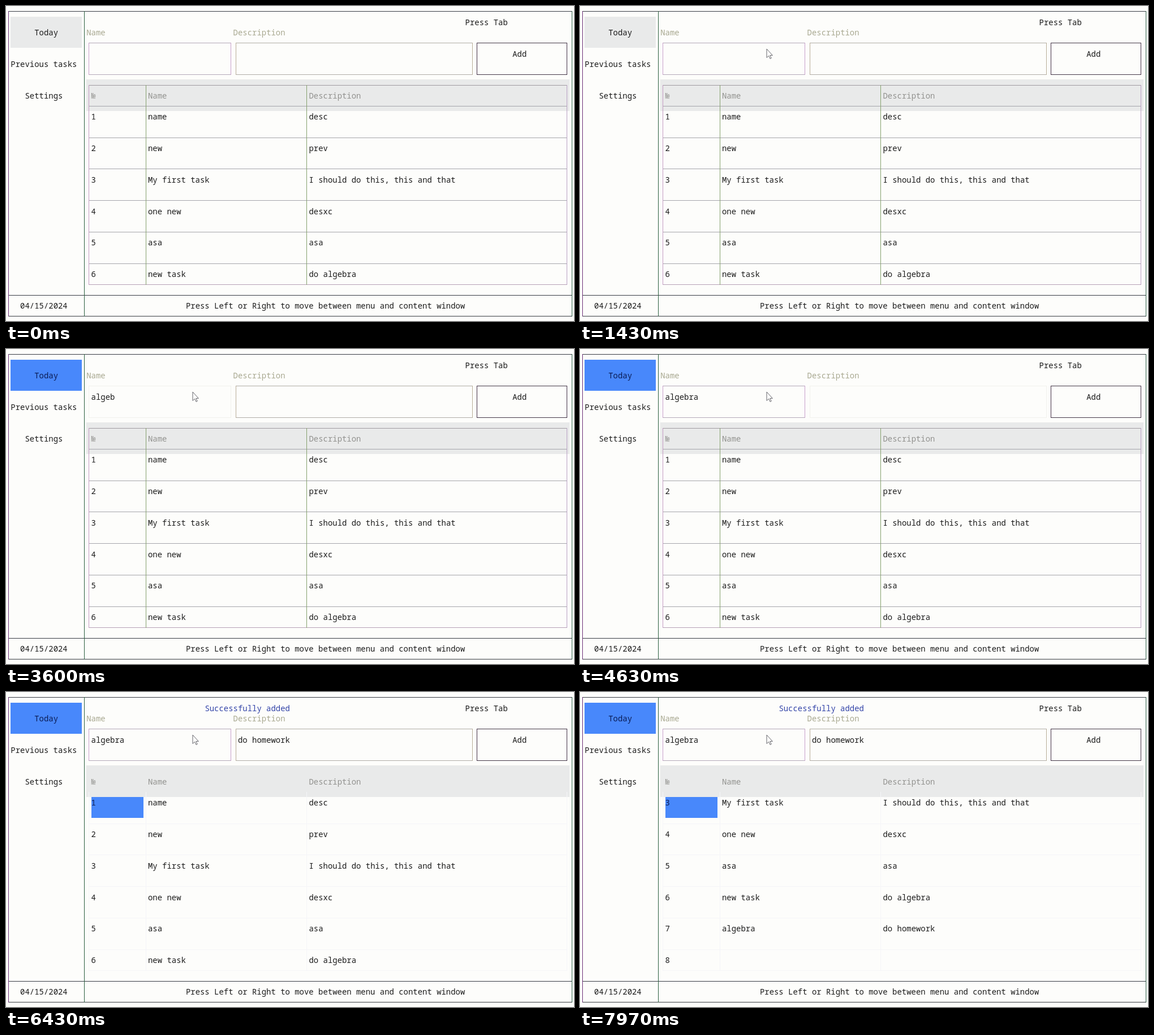
Animation, 1004 px wide and 558 px high, one loop 8 s. Source, as an HTML page:

```html
<!DOCTYPE html>
<html lang="en">
<head>
<meta charset="utf-8">
<title>Task list</title>
<style>
  html, body { margin: 0; width: 100%; height: 100%; overflow: hidden; background: #fdfdfb; }
  svg { display: block; width: 100%; height: 100%; }
  text { font: 13.945px "Noto Sans Mono", "DejaVu Sans Mono", monospace; white-space: pre; fill: #1c1c1c; }
  .label { fill: #a9a991; }
  .head { fill: #92928f; }
  .ok { fill: #3344a8; }
  .selected { fill: #0b1c55; }
  line, rect { shape-rendering: crispEdges; }
  line { stroke-width: 1; }
</style>
</head>
<body>
<svg id="stage" viewBox="0 0 1004 558"></svg>
<script>
// The stage is a terminal of 120 by 30 character cells.
const LOOP = 8000, CELL_W = 1004 / 120, CELL_H = 558 / 30;
const BLUE = '#4888fb', PALE = '#e9eaea', FAINT = '#f1f1ec';
const svg = document.getElementById('stage');

function add(tag, attrs, content = '') {
  const el = document.createElementNS('http://www.w3.org/2000/svg', tag);
  for (const key in attrs) el.setAttribute(key, attrs[key]);
  el.textContent = content;
  return svg.appendChild(el);
}
const label = (col, row, content, cls = '') =>
  add('text', { x: col * CELL_W, y: Math.round(row * CELL_H + 15.2), class: cls }, content);
const fillRect = (col, row, cols, rows, fill) => add('rect', {
  x: col * CELL_W, y: row * CELL_H, width: cols * CELL_W, height: rows * CELL_H, fill
});
// Box-drawing lines run through the middle of their cells.
const middle = (cell, size) => Math.floor((cell + 0.5) * size + 0.501) + 0.5;
const hLine = (row, from, to, stroke) => add('line', {
  x1: middle(from, CELL_W) - 0.5, x2: middle(to, CELL_W) + 0.5,
  y1: middle(row, CELL_H), y2: middle(row, CELL_H), stroke
});
const vLine = (col, from, to, stroke) => add('line', {
  x1: middle(col, CELL_W), x2: middle(col, CELL_W),
  y1: middle(from, CELL_H) - 0.5, y2: middle(to, CELL_H) + 0.5, stroke
});
const show = (el, on) => el.setAttribute('visibility', on ? 'visible' : 'hidden');

// Window frame
hLine(0, 0, 119, '#383c44');
hLine(29, 0, 119, '#383c44');
hLine(27, 0, 119, '#383c44');
vLine(0, 0, 29, '#6c3078');
vLine(119, 0, 29, '#2c6048');
vLine(16, 0, 29, '#2c6040');

// Menu and footer
const menuMark = fillRect(1, 1, 15, 3, BLUE);
const today = label(6, 2, 'Today');
label(1, 5, 'Previous tasks');
label(4, 8, 'Settings');
label(3, 28, '04/15/2024');
label(38, 28, 'Press Left or Right to move between menu and content window');

// Form
label(17, 2, 'Name', 'label');
label(48, 2, 'Description', 'label');
label(97, 1, 'Press Tab');
const success = label(42, 1, 'Successfully added', 'ok');

function field(left, right, horizontal, vertical) {
  const sides = [
    [hLine(3, left, right), horizontal], [hLine(6, left, right), horizontal],
    [vLine(left, 3, 6), vertical], [vLine(right, 3, 6), vertical]
  ];
  return focused => sides.forEach(([el, color]) => el.setAttribute('stroke', focused ? FAINT : color));
}
const fields = [
  field(17, 47, '#b3a8b8', '#c8a0cc'),
  field(48, 98, '#b0aca6', '#b8ae98'),
  field(99, 118, '#443848', '#443048')
];
const nameText = label(18, 4, '');
const descText = label(49, 4, '');
label(107, 4, 'Add');

// Table
fillRect(17, 7, 102, 3, PALE);
const rules = [];
const rule = (el, color, inHeader = false) => rules.push({ el, color, inHeader });
for (let i = 0; i < 6; i++) rule(hLine(9 + i * 3, 17, 118), '#a5a5ab', i === 0);
rule(hLine(7, 17, 118), '#a09aa0', true);
rule(hLine(26, 17, 118), '#b59fb5');
[[17, '#c49cc4'], [29, '#85a06e'], [63, '#85a06e'], [118, '#b8a0c4']].forEach(([col, color]) => {
  rule(vLine(col, 7, 9), color, true);
  rule(vLine(col, 10, 26), color);
  rule(vLine(col, 9, 10), color);
});

const columns = [18, 30, 64];
['№', 'Name', 'Description'].forEach((title, i) => label(columns[i], 8, title, 'head'));

const tasks = [
  ['name', 'desc'], ['new', 'prev'],
  ['My first task', 'I should do this, this and that'],
  ['one new', 'desxc'], ['asa', 'asa'],
  ['new task', 'do algebra'], ['algebra', 'do homework']
];
const rowMark = fillRect(18, 10, 11, 2, BLUE);
const slots = [0, 1, 2, 3, 4, 5].map(i => columns.map(col => label(col, 10 + i * 3, '')));

const pointer = add('path', {
  d: 'M330 76V91.5L333.6 88.2L336 93.4L338.2 92.4L335.8 87.4H340.3Z',
  fill: '#fdfdfc', stroke: '#66666c'
});

const NAME = 2100, DESC = 4300, ADD = 5950, ADDED = 6200, TABLE = 6400;
const steps = (t, start, gap, max) =>
  Math.max(0, Math.min(max, Math.floor((t - start) / gap) + 1));
const typed = (word, t, start, gap) => word.slice(0, steps(t, start, gap, word.length));

function render(t) {
  const focus = [NAME, DESC, ADD, TABLE].filter(start => t >= start).length - 1;
  const inContent = focus >= 0, inTable = focus === 3;

  show(pointer, t >= 650);
  menuMark.setAttribute('fill', inContent ? BLUE : PALE);
  today.setAttribute('class', inContent ? 'selected' : '');
  fields.forEach((paint, i) => paint(focus === i));
  nameText.textContent = typed('algebra', t, 2950, 150);
  descText.textContent = typed('do homework', t, 4750, 100);
  show(success, t >= ADDED);

  rules.forEach(({ el, color, inHeader }) => {
    el.setAttribute('stroke', inTable ? '#f5f5f8' : color);
    show(el, !(inTable && inHeader));
  });

  const down = steps(t, 6500, 60, 10), up = steps(t, 7350, 80, 8);
  const selected = 1 + down - up;
  const top = up ? Math.min(6, selected) : Math.max(1, selected - 5);
  const slot = selected - top;
  show(rowMark, inTable);
  rowMark.setAttribute('y', (10 + slot * 3) * CELL_H);
  rowMark.setAttribute('height', slot === 5 ? CELL_H : CELL_H * 2);
  slots.forEach((cells, i) => {
    const number = top + i;
    const [name, desc] = tasks[number - 1] || ['', ''];
    [number, name, desc].forEach((value, c) => { cells[c].textContent = value; });
    cells[0].setAttribute('class', inTable && i === slot ? 'selected' : '');
  });
}

const origin = performance.now();
function tick() {
  render((performance.now() - origin) % LOOP);
  requestAnimationFrame(tick);
}
tick();
</script>
</body>
</html>
```
